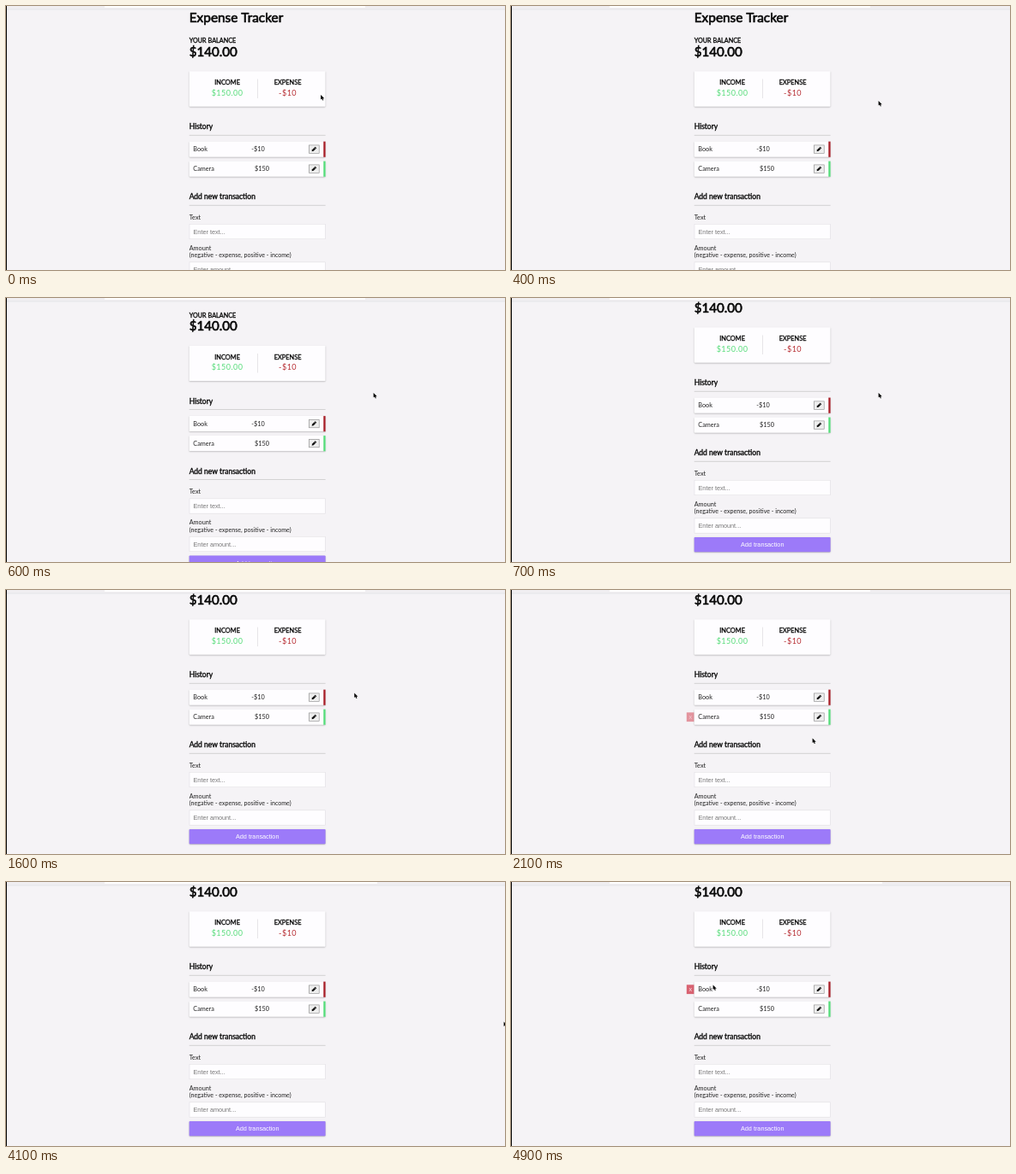
Write an HTML page with a canvas that moves like this. It is 582x309 px and loops after 5 s.

```html
<!DOCTYPE html>
<html lang="en">
<head>
<meta charset="utf-8">
<title>Expense Tracker</title>
<style>
html, body { margin: 0; width: 100%; height: 100%; overflow: hidden; background: #f5f3f6; }
canvas { display: block; }
</style>
</head>
<body>
<canvas id="stage" width="582" height="309"></canvas>
<script>
const ctx = document.getElementById('stage').getContext('2d');
const LOOP = 5000, STEP = 100;
const LATO = 'Lato, sans-serif';
const ARIAL = '"Liberation Sans", Arial, sans-serif';
const GREEN = '#55dc79', RED = '#b62a30', INK = '#080808';
const BODY = 7.27, LEFT = 213.7, WIDTH = 158.9;
const ROW_GAP = 23, FIELD_GAP = 44.5, SCROLL = 42;

const arrow = new Path2D('M0 0V5.6L1.3 4.5 2.2 6.6 3.2 6.2 2.4 4.2H4.2Z');
const pencil = new Path2D('M-3.7 0L-2 -1.2H3V1.2H-2Z');

// Pointer stops
const start = { x: 366.5, y: 103.5 };
const rest = { x: 428, y: 110.5 };
const camera = { x: 361, y: 139 };
const below = { x: 351, y: 173 };
const exit = { x: 549, y: 196 };
const enter = { x: 580, y: 163 };
const book = { x: 235, y: 120 };

const ramp = (t, from, to) => Math.min(1, Math.max(0, (t - from) / (to - from)));
const mix = (a, b, u) => ({ x: a.x + (b.x - a.x) * u, y: a.y + (b.y - a.y) * u });
const curve = (a, bend, b, u) => mix(mix(a, bend, u), mix(bend, b, u), u);

function pointerAt(t) {
  if (t < 1500) return mix(start, rest, ramp(t, 0, 400));
  if (t < 1900) return mix(rest, camera, ramp(t, 1500, 1800));
  if (t < 2100) return mix(camera, below, ramp(t, 1900, 2100));
  if (t < 2800) return curve(below, { x: 560, y: 295 }, exit, ramp(t, 2100, 2700));
  if (t >= 4100) return curve(enter, { x: 289, y: 224 }, book, ramp(t, 4100, 4900));
  return null;
}

function rect(x, y, w, h, color) {
  ctx.fillStyle = color;
  ctx.fillRect(x, y, w, h);
}

function text(str, x, y, { size = BODY, color = '#222', font = LATO, align = 'left', bold = 0, spacing = 0 } = {}) {
  ctx.font = `${size}px ${font}`;
  ctx.textAlign = align;
  ctx.letterSpacing = `${spacing}px`;
  ctx.fillStyle = ctx.strokeStyle = color;
  ctx.fillText(str, x, y);
  if (bold) {
    ctx.lineWidth = bold;
    ctx.lineJoin = 'round';
    ctx.strokeText(str, x, y);
  }
}

function heading(str, x, y, size = BODY, align = 'left') {
  text(str, x, y, { size, align, color: INK, bold: size / 24 });
}

function card(y, h, color = '#fefdff') {
  ctx.save();
  ctx.shadowColor = 'rgba(0,0,0,.27)';
  ctx.shadowBlur = 1.6;
  ctx.shadowOffsetY = .6;
  ctx.fillStyle = color;
  ctx.beginPath();
  ctx.roundRect(LEFT, y, WIDTH, h, .8);
  ctx.fill();
  ctx.restore();
}

function section(title, y) {
  heading(title, LEFT, y, 8.5);
  rect(LEFT, y + 6.7, WIDTH, .6, '#bbb');
}

function total(label, amount, x, color) {
  heading(label, x, 92.3, 7.4, 'center');
  text(amount, x, 104.8, { size: 9.08, align: 'center', spacing: .454, color });
}

function editButton(x, y) {
  rect(x - 6.2, y - 5, 12.4, 10, '#888');
  rect(x - 5.6, y - 4.4, 11.2, 8.8, '#eee');
  ctx.save();
  ctx.translate(x, y);
  ctx.rotate(-Math.PI / 4);
  ctx.fillStyle = '#111';
  ctx.fill(pencil);
  rect(1.5, -1.2, .3, 2.4, '#ddd');
  ctx.restore();
}

function transaction(name, amount, amountX, row, color, fade) {
  const y = 167.6 + row * ROW_GAP;
  ctx.globalAlpha = fade;
  rect(204.8, y - 5.3, 8.8, 10.8, '#d33f50');
  text('x', 209.2, y + 2.2, { color: '#fff', align: 'center' });
  ctx.globalAlpha = 1;
  card(y - 9, 18.2);
  rect(370.3, y - 9, 2.3, 18.2, color);
  text(name, 218.3, y + 2.6);
  text(amount, amountX, y + 2.6);
  editButton(359.3, y);
}

function field(hint, row) {
  const y = 255 + row * FIELD_GAP;
  rect(LEFT, y, WIDTH, 18, '#e2e0e3');
  rect(LEFT + .6, y + .6, WIDTH - 1.2, 16.8, '#fefdff');
  text(hint, 218.5, y + 11.6, { font: ARIAL, color: '#777' });
}

function page(t) {
  const cameraFade = .78 * (ramp(t, 1900, 2000) - ramp(t, 2000, 2300));
  const bookFade = .8 * ramp(t, 4700, 4900);

  heading('Expense Tracker', LEFT, 19, 15.4);
  heading('YOUR BALANCE', LEFT, 43.4);
  heading('$140.00', LEFT, 58.8, 15.1);

  card(76.3, 41.5);
  rect(293, 85.5, .6, 22.5, '#d8d6d9');
  total('INCOME', '$150.00', 258.1, GREEN);
  total('EXPENSE', '-$10', 328.6, RED);

  section('History', 144.2);
  transaction('Book', '-$10', 286.3, 0, '#a81f28', bookFade);
  transaction('Camera', '$150', 290, 1, GREEN, cameraFade);

  section('Add new transaction', 226.2);
  text('Text', LEFT, 249.5);
  field('Enter text...', 0);
  text('Amount', LEFT, 285.5);
  text('(negative - expense, positive - income)', LEFT, 294.1, { size: 7.1 });
  field('Enter amount...', 1);

  card(322, 17.3, '#9c7af9');
  text('Add transaction', 293.2, 333.2, { font: ARIAL, color: '#fff', align: 'center' });
}

function browserEdge(t) {
  rect(0, 0, 582, 4, '#f0eef1');
  rect(0, 3.6, 582, .8, '#e2e0e3');
  rect(115, 0, t < 2300 ? 304 : 318, 2, '#fff');
  rect(0, 0, 1, 309, '#080808');
}

function pointer({ x, y }) {
  ctx.save();
  ctx.translate(x + .6, y + .5);
  ctx.lineWidth = .7;
  ctx.strokeStyle = '#fff';
  ctx.stroke(arrow);
  ctx.fillStyle = '#000';
  ctx.fill(arrow);
  ctx.restore();
}

function draw(now) {
  const t = Math.floor((now % LOOP) / STEP) * STEP;
  rect(0, 0, 582, 309, '#f5f3f6');
  ctx.save();
  ctx.translate(0, -SCROLL * ramp(t, 400, 700) ** 1.77);
  page(t);
  ctx.restore();
  browserEdge(t);
  const tip = pointerAt(t);
  if (tip) pointer(tip);
}

function tick() {
  draw(performance.now());
  requestAnimationFrame(tick);
}
tick();
</script>
</body>
</html>
```
